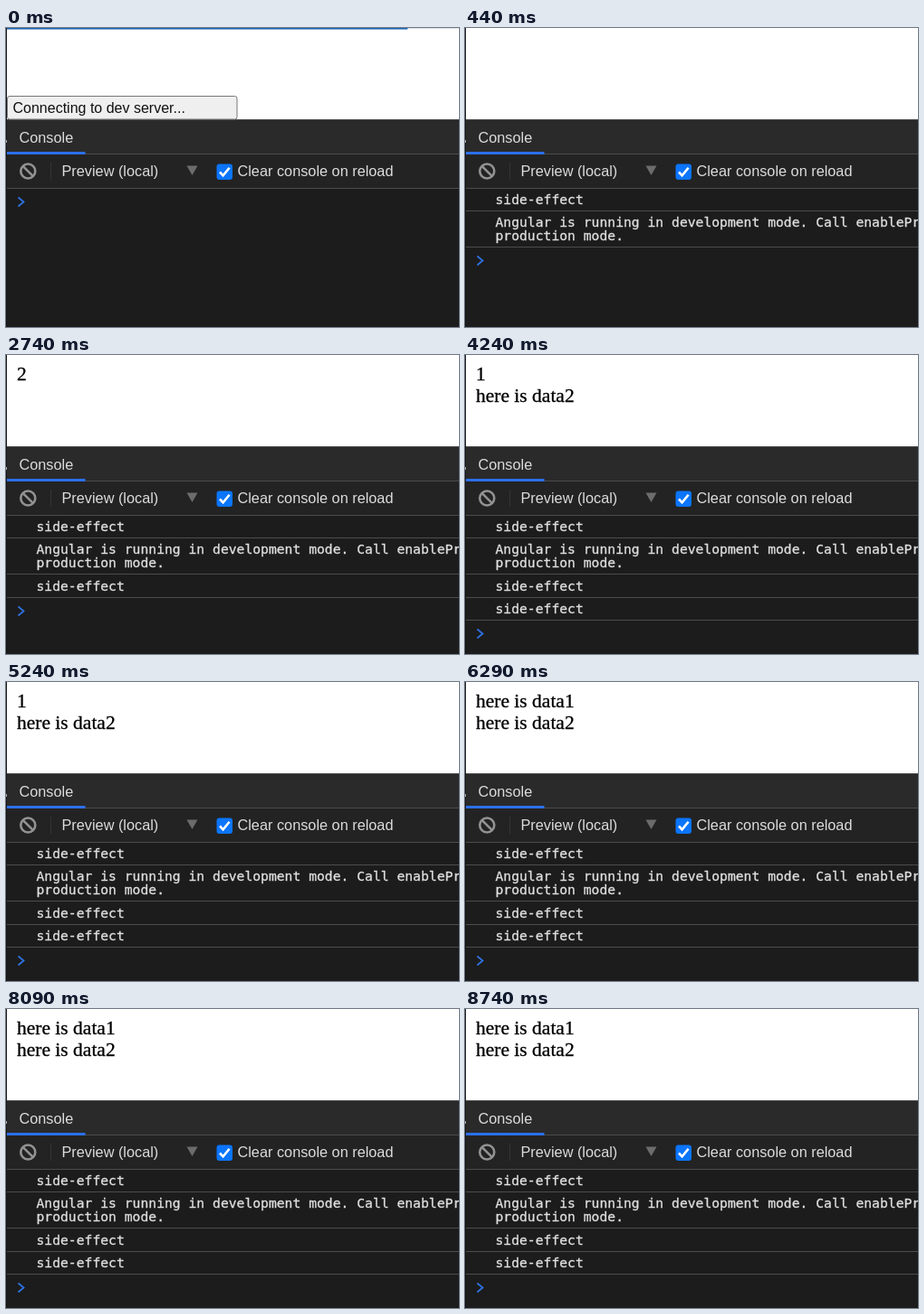
Animation of 500x331 px, one loop 8790 ms. Source, as an HTML page:

```html
<!DOCTYPE html>
<html lang="en">
<head>
<meta charset="utf-8">
<title>Dev console</title>
<style>
  html, body { margin: 0; width: 100%; height: 100%; overflow: hidden; background: #1c1c1c; }
  svg { display: block; width: 100vw; height: 100vh; }
  text { white-space: pre; stroke-width: .3px; }
  .ui { font: 16.3px "Liberation Sans", Arial, sans-serif; fill: #dcdcdc; }
  .button { font: 16px "Liberation Sans", Arial, sans-serif; fill: #111; }
  .page { font: 21.5px "Liberation Serif", Times, serif; fill: #000; stroke: #000; }
  .log { font: 14.7px "DejaVu Sans Mono", monospace; fill: #e0e0e0; stroke: #e0e0e0; }
  .rule { stroke: #4c4c4c; }
</style>
</head>
<body>
<svg viewBox="0 0 500 331">
  <rect width="500" height="331" fill="#1c1c1c"/>
  <rect x="1" width="499" height="101" fill="#fff"/>
  <rect y="101" width="500" height="38" fill="#2a2a2a"/>
  <rect y="140" width="500" height="37" fill="#232323"/>
  <path class="rule" d="M1 101.5H500M1 139.5H500M1 177.5H500"/>
  <rect width="1" height="331" fill="#161616"/>
  <rect y="124" width="1" height="3" fill="#aaa"/>

  <text class="ui" x="14.5" y="126.5">Console</text>
  <rect x="1" y="137" width="86.5" height="3" fill="#2b70ea"/>
  <g fill="none" stroke="#929292" stroke-width="2.6">
    <circle cx="24.3" cy="158.5" r="8"/>
    <path d="M18.6 152.8l11.4 11.4"/>
  </g>
  <path d="M49.5 149V168" stroke="#333"/>
  <text class="ui" x="61.5" y="164">Preview (local)</text>
  <path d="M199.5 152.5h12l-6 10.5z" fill="#6c6c6c"/>
  <rect x="232.5" y="150.5" width="17.5" height="17.5" rx="3" fill="#0b75fb"/>
  <path d="M236 159.5l3.6 3.8 7-8.6" fill="none" stroke="#fff" stroke-width="2.6"/>
  <text class="ui" x="255.5" y="164">Clear console on reload</text>

  <g id="loading">
    <rect x="1" width="499" height="1.2" fill="#dfe3e8"/>
    <rect id="bar" x="1" width="442" height="1.5" fill="#1765b5"/>
    <rect x="1.5" y="75.5" width="253.5" height="25.5" rx="2.5" fill="#efefef" stroke="#767676"/>
    <text class="button" x="7.5" y="94">Connecting to dev server...</text>
  </g>
  <text class="page" id="first" x="12" y="28"></text>
  <text class="page" id="second" x="12" y="52"></text>
  <g id="logs"></g>
  <path id="prompt" fill="none" stroke="#2e72e2" stroke-width="1.8"/>
</svg>
<script>
  const LOOP = 8790;
  const READY = 300, SECOND_CALL = 2040, FIRST_CALL = 4040, DONE = 6040;
  const byId = id => document.getElementById(id);

  // Each entry: time shown, baseline, bottom rule, lines of text.
  const entries = [
    [READY, 195, 202.5, ["side-effect"]],
    [READY, 220, 242.5, [
      "Angular is running in development mode. Call enableProdMode() to enable",
      "production mode."]],
    [SECOND_CALL, 261, 268.5, ["side-effect"]],
    [FIRST_CALL, 286, 293.5, ["side-effect"]],
  ].map(([start, baseline, bottom, lines]) => {
    const group = document.createElementNS("http://www.w3.org/2000/svg", "g");
    group.innerHTML = lines.map((line, i) =>
      `<text class="log" x="33.5" y="${baseline + i * 15}">${line}</text>`).join("") +
      `<path class="rule" d="M1 ${bottom}H500"/>`;
    byId("logs").append(group);
    return { start, bottom, group };
  });

  const show = (node, visible) => node.setAttribute("display", visible ? "inline" : "none");

  function render(t) {
    show(byId("loading"), t < READY);
    byId("bar").setAttribute("width", Math.min(499, 442 + t * 0.3));

    let bottom = 177.5;
    for (const entry of entries) {
      const visible = t >= entry.start;
      show(entry.group, visible);
      if (visible) bottom = entry.bottom;
    }
    byId("prompt").setAttribute("d", `M13.5 ${bottom + 10}l6 5-6 5`);

    byId("first").textContent =
      t < SECOND_CALL ? "" : t < FIRST_CALL ? "2" : t < DONE ? "1" : "here is data1";
    byId("second").textContent = t < FIRST_CALL ? "" : "here is data2";
  }

  const origin = performance.now();
  function tick() {
    render((performance.now() - origin) % LOOP);
    requestAnimationFrame(tick);
  }
  tick();
</script>
</body>
</html>
```
